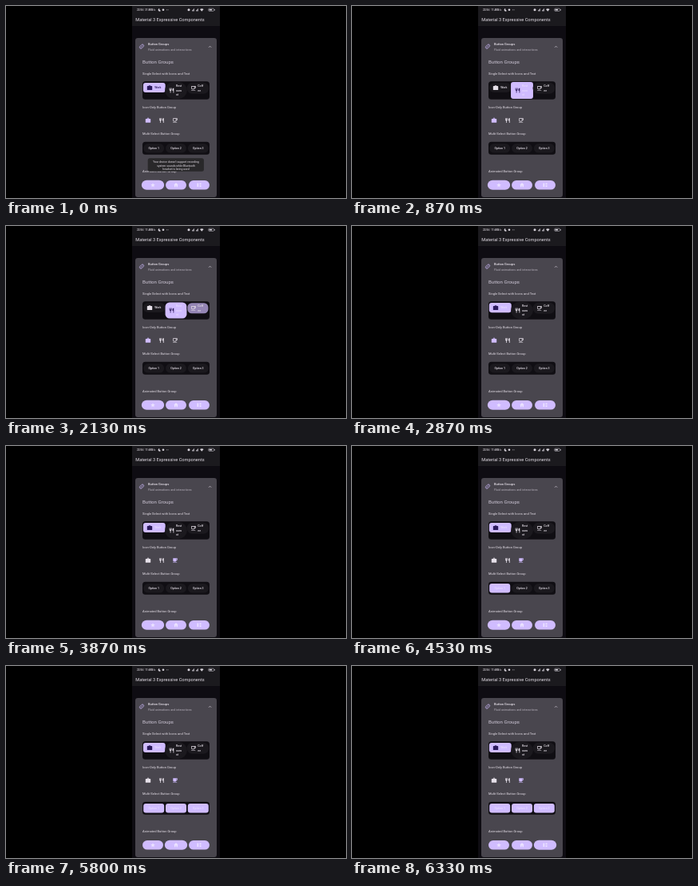
An HTML page that plays this animation: 426 px wide and 240 px high, repeating every 6390 ms.

```html
<!DOCTYPE html>
<html lang="en">
<head>
<meta charset="utf-8">
<style>
html, body { margin: 0; width: 100%; height: 100%; overflow: hidden; background: #000; }
svg { display: block; width: 100vw; height: 100vh; }
text { font-family: Roboto, "Open Sans", sans-serif; fill: #e6e0e9; }
.title { font-size: 5.6px; }
.head { font-size: 6.1px; fill: #cfc8d8; }
.section { font-size: 4.08px; }
.sub { font-size: 3.57px; letter-spacing: .06px; fill: #bbb5c1; }
.label { font-size: 3.57px; font-weight: 500; }
.status { font-size: 3.1px; font-weight: 500; }
.toast { font-size: 3.45px; }
.mid { text-anchor: middle; }
</style>
</head>
<body>
<svg viewBox="0 0 426 240">
  <defs>
    <path id="work" d="M-3.2-1.5Q-3.2-2.1-2.6-2.1H-1.2V-2.6Q-1.2-3.2-.6-3.2H.6Q1.2-3.2 1.2-2.6V-2.1H2.6Q3.2-2.1 3.2-1.5V2.2Q3.2 2.8 2.6 2.8H-2.6Q-3.2 2.8-3.2 2.2ZM-.6-2.6V-2.1H.6V-2.6Z" fill-rule="evenodd"/>
    <path id="food" d="M-2.9-3H-2.3V-1H-1.8V-3H-1.2V-1H-.7V-3H-.1V-.8Q-.1.2-1.1.4V3H-1.9V.4Q-2.9.2-2.9-.8ZM1-1.4Q1-3 2.7-3V3H1.9V.6H1Z"/>
    <path id="cupFull" d="M-2.7-2.7H2.2Q2.9-2.7 2.9-2V-.9Q2.9-.1 2.1-.1H1.5V.3Q1.5 1.5.3 1.5H-1.5Q-2.7 1.5-2.7.3ZM1.5-2V-.8H2.2V-2ZM-2.9 2.2H2.2V2.8H-2.9Z" fill-rule="evenodd"/>
    <path id="cup" d="M-2.7-2.7H2.2Q2.9-2.7 2.9-2V-.9Q2.9-.1 2.1-.1H1.5V.3Q1.5 1.5.3 1.5H-1.5Q-2.7 1.5-2.7.3ZM1.5-2V-.8H2.2V-2ZM-2-2V.3Q-2 .8-1.5.8H.3Q.8.8.8.3V-2ZM-2.9 2.2H2.2V2.8H-2.9Z" fill-rule="evenodd"/>
    <path id="star" d="M0-2.8.8-.9 2.8-.7 1.2.6 1.7 2.6 0 1.5-1.7 2.6-1.2.6-2.8-.7-.8-.9Z"/>
    <path id="home" d="M0-2.7 2.8 0H2V2.5H.6V.7H-.6V2.5H-2V0H-2.8Z"/>
    <path id="tiles" d="M-2.5-2.2H-.8V2.2H-2.5ZM.6-2.2H2.5V-.5H.6ZM.6.5H2.5V2.2H.6Z"/>
  </defs>
  <rect x="158" width="110" height="240" fill="#0e0c12"/>
  <rect x="158" width="110" height="25" fill="#1b1a1e"/>
  <text id="clock" class="status" x="164" y="6"></text>
  <g fill="#d8d4dc">
    <path d="M192.3 3.1A1.8 1.8 0 1 0 194 5.8 2 2 0 0 1 192.3 3.1Z"/>
    <circle cx="197" cy="4.8" r="1.3"/>
    <path d="M201 4.5h.8v.8h-.8zm1.7 0h.8v.8h-.8z"/>
    <circle cx="229" cy="4.8" r="1.5"/>
    <path d="M233 6.4h.7V5H233zm1.1 0h.7V4.2h-.7zm1.1 0h.7V3.2h-.7zM238 6.4h.7V5H238zm1.1 0h.7V4.2h-.7zm1.1 0h.7V3.2h-.7zM243 4Q245.3 2.4 247.6 4L245.3 6.7Z"/>
    <rect x="253.7" y="3.2" width="6.8" height="3.2" rx="1" fill="none" stroke="#d8d4dc" stroke-width=".5"/>
    <path d="M254.5 4h3.6v1.6h-3.6zM261.2 4.2h.8v1.2h-.8z"/>
  </g>
  <text class="title" x="162.3" y="18.7">Material 3 Expressive Components</text>

  <rect x="162" y="40" width="102" height="199" rx="3.2" fill="#49464e"/>
  <g transform="translate(170 50.6) rotate(-45)" fill="none" stroke="#d0bcff" stroke-width=".7">
    <rect x="-3" y="-1.6" width="6" height="3.2" rx="1.6"/>
    <path d="M-1.5 0H1.5"/>
  </g>
  <text class="section" font-weight="500" x="178" y="49.2">Button Groups</text>
  <text class="sub" x="178" y="56">Fluid animations and interactions</text>
  <path d="M254 51.8 255.6 50.2 257.2 51.8" fill="none" stroke="#e6e0e9" stroke-width=".6"/>
  <text class="head" x="171" y="72.4">Button Groups</text>
  <text class="section" x="171" y="86">Single Select with Icons and Text</text>
  <text class="section" x="171" y="128.1">Icon-Only Button Group</text>
  <text class="section" x="171" y="161.4">Multi-Select Button Group</text>
  <text class="section" x="171" y="208.4">Animated Button Group</text>
  <rect x="171" y="94.3" width="84" height="22.4" rx="3.5" fill="#100e13"/>
  <rect x="171" y="169.8" width="84" height="16" rx="3.5" fill="#100e13"/>
  <g id="parts"></g>

  <g id="toast">
    <rect x="177.7" y="190.2" width="70.2" height="16.5" rx="2.5" fill="#29282a"/>
    <g class="mid">
      <text class="toast" x="213" y="196.2">Your device doesn't support recording</text>
      <text class="toast" x="213" y="200.5">system sounds while Bluetooth</text>
      <text class="toast" x="213" y="204.8">headset is being used</text>
    </g>
  </g>
</svg>
<script>
const LOOP = 6390;
const LILAC = '#d0bcff', INK = '#2c1a5c', LIGHT = '#e6e0e9', PALE = '#e6dafc';
const $ = id => document.getElementById(id);
const parts = $('parts');

function add(tag, attrs, text = '') {
  const el = document.createElementNS('http://www.w3.org/2000/svg', tag);
  for (const key in attrs) el.setAttribute(key, attrs[key]);
  el.textContent = text;
  return parts.appendChild(el);
}
const icon = (name, x, y, fill = LIGHT) =>
  add('use', { href: '#' + name, transform: `translate(${x} ${y})`, fill });
const setFill = (el, color) => { el.style.fill = color; };
const clamp = v => Math.min(1, Math.max(0, v));

// Dark pill under a lilac layer that grows and squares off when chosen
function button(cx, cy, w, h) {
  const box = { x: cx - w / 2, y: cy - h / 2, width: w, height: h, rx: h / 2 };
  add('rect', { ...box, fill: '#1b191e' });
  return { cx, cy, h, el: add('rect', { ...box, fill: LILAC }) };
}
function scale(el, cx, cy, sx, sy = sx) {
  el.setAttribute('transform', `translate(${cx} ${cy}) scale(${sx} ${sy}) translate(${-cx} ${-cy})`);
}
function showButton(b, amount) {
  b.el.setAttribute('opacity', clamp(amount * 2));
  b.el.setAttribute('rx', 3 + (b.h / 2 - 3) * clamp(1 - amount));
  scale(b.el, b.cx, b.cy, .9 + .1 * amount);
}

// Spring from 0 to 1 with a slight overshoot
const spring = age => age <= 0 ? 0 : 1 - Math.exp(-age / 75) * Math.cos(age / 85);
const between = (t, start, end) => spring(t - start) - spring(t - end);

const selects = [
  { x: 185.8, y: 102.1, h: 12, name: 'work', ix: 180, iy: 102.2, lines: ['Work'], tx: 186.2, ty: 103.4 },
  { x: 213, y: 105.5, h: 20.8, name: 'food', ix: 207.6, iy: 105.5, lines: ['Rest', 'aura', 'nt'], tx: 213, ty: 101.4 },
  { x: 240.4, y: 102.8, h: 14, name: 'cup', ix: 235, iy: 102.8, lines: ['Coff', 'ee'], tx: 240.3, ty: 101.4 }
].map(s => ({
  box: button(s.x, s.y, 27.8, s.h),
  icon: icon(s.name, s.ix, s.iy),
  texts: s.lines.map((line, i) => add('text', { class: 'label', x: s.tx, y: s.ty + 5.1 * i }, line))
}));

const icons = ['work', 'food', 'cup'].map((name, i) => icon(name, 178 + 17 * i, 143));

const options = [0, 1, 2].map(i => {
  const x = 185.2 + 27.8 * i;
  return {
    box: button(x, 177.8, 26, 11.6),
    text: add('text', { class: 'label mid', x, y: 179.1 }, 'Option ' + (i + 1))
  };
});

const pills = ['star', 'home', 'tiles'].map((name, i) => {
  const cx = [184, 213, 242][i];
  const el = add('rect', { x: cx - 13, y: 218, width: 26, height: 11.6, rx: 5.8, fill: LILAC });
  icon(name, cx, 223.8, '#ece3ff');
  return { cx, el };
});

function draw(t) {
  const work = 1 - between(t, 700, 2700);
  const coffee = between(t, 1400, 2070);
  [work, 1 - work - coffee, coffee].forEach((amount, i) => {
    const s = selects[i], on = amount > .5;
    showButton(s.box, amount);
    setFill(s.icon, on ? INK : LIGHT);
    const color = !on ? LIGHT : t < 700 ? INK : PALE;
    s.texts.forEach(el => setFill(el, color));
  });

  const picked = t < 3200 ? 0 : t < 3600 ? 1 : 2;
  icons.forEach((el, i) => setFill(el, i === picked ? LILAC : LIGHT));
  icons[2].setAttribute('href', picked === 2 ? '#cupFull' : '#cup');

  options.forEach((o, i) => {
    const amount = spring(t - 4270 - 330 * i);
    showButton(o.box, amount);
    setFill(o.text, amount > .5 ? PALE : LIGHT);
  });

  const widths = [1 - spring(t - 5650), between(t, 5650, 6060), spring(t - 6060)];
  pills.forEach((p, i) => scale(p.el, p.cx, 223.8, 1 + .09 * widths[i], 1 + .03 * widths[i]));

  $('toast').setAttribute('opacity', clamp((670 - t) / 200));
  $('clock').textContent = '22:56 | ' + (t < 700 ? '31.8' : t < 2700 ? '11.4' : '11.6') + 'KB/s';
}

function frame() {
  draw(performance.now() % LOOP);
  requestAnimationFrame(frame);
}
frame();
</script>
</body>
</html>
```
